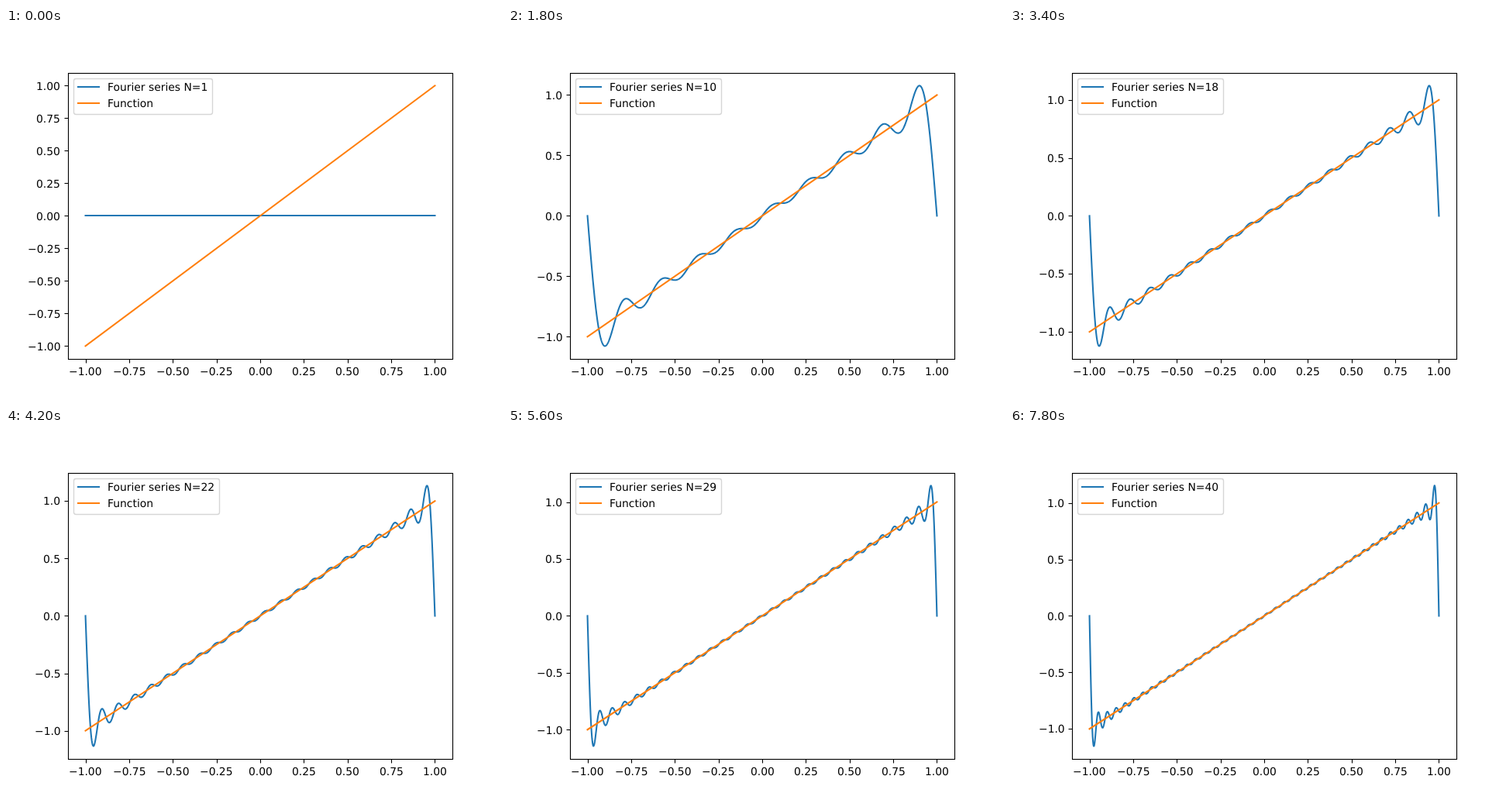
An HTML page with a canvas that plays this animation: 640x480 px, repeating every 8 s.

```html
<!DOCTYPE html>
<html lang="en">
<head>
<meta charset="utf-8">
<title>Fourier series</title>
<style>
  html, body { margin: 0; width: 100%; height: 100%; overflow: hidden; background: #fff; }
  canvas { display: block; width: 640px; height: 480px; }
</style>
</head>
<body>
<canvas id="plot" width="640" height="480"></canvas>
<script>
const ctx = document.getElementById('plot').getContext('2d');
const STEP_MS = 200, STEPS = 40, SAMPLES = 1000;
const BLUE = '#1f77b4', ORANGE = '#ff7f0e';
const LEFT = 80, RIGHT = 576, TOP = 57.6, BOTTOM = 427.2;
const MID_X = 328, MID_Y = 242.4;
const UNIT_X = (RIGHT - LEFT) / 2.2;
const HALF_HEIGHT = (BOTTOM - TOP) / 2.2;
const THIN = 0.8 * 100 / 72, THICK = 1.5 * 100 / 72;

const snap = v => Math.floor(v + 0.5) + 0.5;

// Partial sum of the sine series of f(x) = x on [-1, 1].
function fourier(x, terms) {
  let sum = 0;
  for (let n = 1; n <= terms; n++) {
    sum += (n % 2 ? 1 : -1) * Math.sin(n * Math.PI * x) / n;
  }
  return 2 / Math.PI * sum;
}

function line(points, color, width, cap = 'square') {
  ctx.beginPath();
  points.forEach(([x, y]) => ctx.lineTo(x, y));
  ctx.strokeStyle = color;
  ctx.lineWidth = width;
  ctx.lineCap = cap;
  ctx.lineJoin = 'round';
  ctx.stroke();
}

// align: 0 = left, 0.5 = centre, 1 = right
function text(str, x, baseline, align = 0) {
  ctx.fillStyle = '#000';
  ctx.fillText(str, Math.round(x - align * ctx.measureText(str).width), Math.round(baseline));
}

function ticks(step, limit, decimals, draw) {
  const last = Math.floor(limit / step);
  for (let i = -last; i <= last; i++) {
    const value = i * step;
    draw(value, (value < 0 ? '\u2212' : '') + Math.abs(value).toFixed(decimals));
  }
}

function drawAxes(peak, toX, toY) {
  ticks(0.25, 1.1, 2, (v, label) => {
    const x = snap(toX(v));
    line([[x, 427.5], [x, 432.5]], '#000', THIN, 'butt');
    text(label, toX(v), 448, 0.5);
  });
  const limit = 1.1 * peak;
  const fine = 2 * limit / 9 <= 0.25;
  ticks(fine ? 0.25 : 0.5, limit, fine ? 2 : 1, (v, label) => {
    const y = snap(toY(v));
    line([[75.5, y], [80.5, y]], '#000', THIN, 'butt');
    text(label, 70.28, toY(v) + 5.28, 1);
  });
}

function drawFrame() {
  ctx.strokeStyle = '#000';
  ctx.lineWidth = THIN;
  ctx.lineJoin = 'miter';
  ctx.strokeRect(80.5, 58.5, 496, 369);
}

function drawLegend(n) {
  const title = `Fourier series N=${n}`;
  const right = snap(131.39 + ctx.measureText(title).width + 5.56);
  ctx.beginPath();
  ctx.roundRect(87.5, 65.5, right - 87.5, 46, 2.78);
  ctx.fillStyle = '#fff';
  ctx.fill();
  ctx.strokeStyle = '#d6d6d6';
  ctx.lineWidth = 100 / 72;
  ctx.stroke();
  [[title, BLUE, 76], ['Function', ORANGE, 97]].forEach(([label, color, y]) => {
    line([[93, y], [120, y]], color, THICK);
    text(label, 131.39, y + 5);
  });
}

function draw(n) {
  const curve = Array.from({ length: SAMPLES }, (_, i) => {
    const x = -1 + 2 * i / (SAMPLES - 1);
    return [x, fourier(x, n - 1)];
  });
  const peak = Math.max(1, ...curve.map(p => p[1]));
  const toX = x => MID_X + x * UNIT_X;
  const toY = y => MID_Y - y * HALF_HEIGHT / peak;
  const flatShift = n === 1 ? -0.4 : 0; // a flat line sits on whole pixels

  ctx.fillStyle = '#fff';
  ctx.fillRect(0, 0, 640, 480);
  ctx.font = '13.889px "DejaVu Sans", sans-serif';
  ctx.textRendering = 'geometricPrecision';
  drawAxes(peak, toX, toY);
  line(curve.map(([x, y]) => [toX(x), toY(y) + flatShift]), BLUE, THICK);
  line([-1, 1].map(v => [toX(v), toY(v)]), ORANGE, THICK);
  drawFrame();
  drawLegend(n);
}

const start = performance.now();
let shown = 0;
function tick() {
  const elapsed = Math.max(0, performance.now() - start);
  const n = Math.floor(elapsed / STEP_MS) % STEPS + 1;
  if (n !== shown) draw(shown = n);
  requestAnimationFrame(tick);
}
tick();
</script>
</body>
</html>
```
